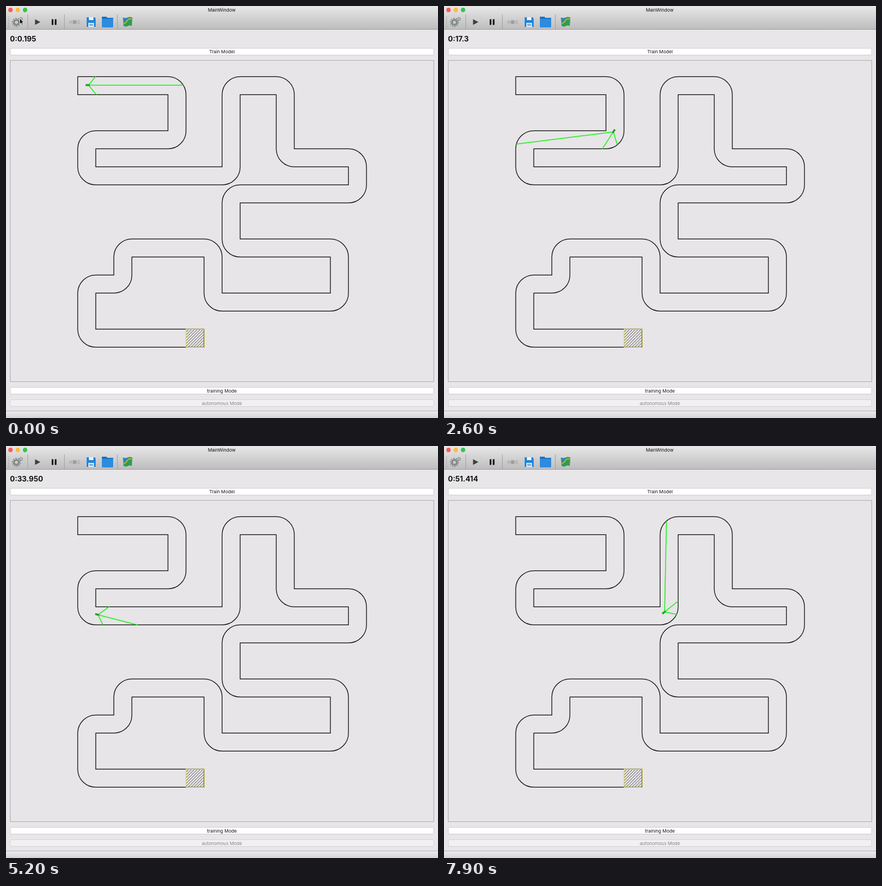
An HTML page that plays this animation: 766x731 px, repeating every 8000 ms.

```html
<!DOCTYPE html>
<html lang="en">
<head>
<meta charset="utf-8">
<title>MainWindow</title>
<style>
  html, body { margin: 0; width: 100%; height: 100%; overflow: hidden; background: #e8e6e8; }
  svg { display: block; width: 766px; height: 731px; }
  text { font: 8.1px Inter, "Liberation Sans", sans-serif; fill: #111; text-anchor: middle; }
  #clock { font-size: 12.9px; font-weight: 700; text-anchor: start; }
</style>
</head>
<body>
<svg id="stage" viewBox="0 0 766 731" xmlns="http://www.w3.org/2000/svg">
  <defs>
    <linearGradient id="bar" x2="0" y2="1">
      <stop stop-color="#e9e8e9"/><stop offset="1" stop-color="#bdbcbd"/>
    </linearGradient>
    <linearGradient id="status" x2="0" y2="1">
      <stop stop-color="#eceaec"/><stop offset="1" stop-color="#d5d3d5"/>
    </linearGradient>
    <pattern id="hatch" width="5.1" height="5.1" patternUnits="userSpaceOnUse" x="319" y="573">
      <path d="M-1 6.1L6.1-1M-1 1L1-1M4.1 6.1L6.1 4.1" stroke="#222" stroke-width=".8"/>
    </pattern>
  </defs>

  <rect width="766" height="731" fill="#e8e6e8"/>
  <rect width="766" height="42" fill="url(#bar)"/>
  <path d="M0 41.5H766" stroke="#a09fa0"/>
  <circle cx="8" cy="7" r="3.9" fill="#fc5b57"/>
  <circle cx="21" cy="7" r="3.9" fill="#fdbc40"/>
  <circle cx="33.8" cy="7" r="3.9" fill="#34c84a"/>
  <text x="382.5" y="10">MainWindow</text>

  <path d="M4.5 19V38" stroke="#858485" stroke-dasharray="1 2"/>
  <path d="M38.5 15V41M103.5 15V41M197.5 15V41" stroke="#a3a2a3"/>

  <g fill="none" stroke="#7f8886">
    <circle cx="18.5" cy="29" r="4.3" stroke-width="3"/>
    <circle cx="18.5" cy="29" r="7" stroke-width="2" stroke-dasharray="2.2 2.2"/>
    <circle cx="26.5" cy="23" r="2.4" stroke-width="2" stroke-dasharray="1.5 .8"/>
  </g>
  <path d="M51.5 23.5L61 28.5L51.5 33.5Z" fill="#3f3f3f"/>
  <path d="M81 23.5h3v10h-3zM86.5 23.5h3v10h-3z" fill="#111"/>
  <g fill="none" stroke="#a09fa0">
    <path d="M111 28.5H132" stroke-dasharray="3 1"/>
    <path d="M113 25L117 28.5L113 32M126 26H131M126 31H131"/>
    <path d="M119 25.5h3a3 3 0 0 1 0 6h-3z" fill="#a09fa0"/>
  </g>
  <path d="M143 20h14l2 2v15h-16z" fill="#1f86dd"/>
  <path d="M147 20h8v5h-8zM146 30h10v7h-10z" fill="#eaf2f8"/>
  <path d="M147.500 32.500h7M147.500 34.500h7" stroke="#3a78b4"/>
  <path d="M170 19h8l2 2h10v3h-20z" fill="#1a6fb9"/>
  <rect x="170" y="22.500" width="20" height="15.500" rx="1" fill="#2b8ce0"/>
  <path d="M207.500 20.500q4 2 8 0t8.500 0l-1 15q-4-2-7 0t-7.500 0z" fill="#2f9d50"/>
  <path d="M207.500 20.500q4 2 8 0l-3 7-4.500 1z" fill="#2f83c4"/>
  <path d="M209 31q4-1 6-5t8-3" fill="none" stroke="#f0b02c" stroke-width="1.600"/>

  <text id="clock" x="7" y="63"></text>
  <g id="buttons"></g>
  <rect x="7.500" y="96.500" width="751" height="570" fill="#e7e5e7" stroke="#adabad"/>
  <rect y="719" width="766" height="12" fill="url(#status)"/>
  <path d="M0 718.500H766" stroke="#b3b1b3"/>

  <g transform="translate(.2 .4)">
    <path id="track" fill="none" stroke="#0b0b0b" stroke-width="1.25"/>
    <rect x="319" y="573" width="32" height="32" fill="url(#hatch)" stroke="#dcd72c"/>
    <path id="rays" fill="none" stroke="#17f017" stroke-width="1.5"/>
    <rect id="car" x="-5" y="-1.500" width="7" height="3" fill="#3d8a3d" stroke="#1fc81f" stroke-width=".6"/>
  </g>
  <path id="cursor" d="M24.500 22v10l2.300-2.100 1.600 3.500 1.500-.7-1.600-3.400h3z" stroke="#fff" stroke-width=".7"/>
</svg>

<script>
const $ = id => document.getElementById(id);
const LOOP = 8000, STEP = 100, SPREAD = 50, CELL = 32, HALF = CELL / 2;
const DIRS = { R: [1, 0], L: [-1, 0], D: [0, 1], U: [0, -1] };

// Road as moves from cell to cell; every bend is round outside and square inside.
const ROUTE = "R5 D3 L5 D2 R8 U5 R3 D4 R4 D2 L7 D3 R6 D3 L7 U3 L5 D2 L2 D3 R6";

// The drive in legs: when each ends, what the clock (ms) then shows, and the way.
const legs = [
  { end: 1100, clock: 7356, way: "M146 140H243" },
  { end: 2600, clock: 17003, way: "M243 140H280Q302 140 302 162V214C302 218 302 220 300 223" },
  { end: 3600, clock: 23498, way: "M300 223C294 231 286 240 272 240L228 239" },
  { end: 5200, clock: 33950, way: "M228 239L168 238Q145 238 145 262V274C145 288 151 296 163 299" },
  { end: 6300, clock: 41086, way: "M163 299C178 303 195 299 215 299H245" },
  { end: 7900, clock: 51414, way: "M245 299H372Q385 299 391 294" }
];
legs.forEach((leg, i) => {
  const before = legs[i - 1] || { end: 0, clock: 195 };
  leg.start = before.end;
  leg.clockStart = before.clock;
  leg.path = document.createElementNS("http://www.w3.org/2000/svg", "path");
  leg.path.setAttribute("d", leg.way);
});

// Corners of both road edges, joined into one closed ring.
function roadCorners() {
  const sides = { 1: [], "-1": [] };
  const normal = d => [d[1], -d[0]];
  const add = (a, b, turn) => [1, -1].forEach(s => sides[s].push({
    x: x + s * HALF * a[0] + HALF * b[0],
    y: y + s * HALF * a[1] + HALF * b[1],
    round: s * turn > 0
  }));
  let x = 127 + HALF, y = 125 + HALF, last = null;
  for (const move of ROUTE.split(" ")) {
    const d = DIRS[move[0]], n = normal(d);
    if (last) {
      const m = normal(last);
      add([m[0] + n[0], m[1] + n[1]], [0, 0], last[0] * d[1] - last[1] * d[0]);
    } else add(n, [-d[0], -d[1]], 0);
    x += d[0] * CELL * move.slice(1);
    y += d[1] * CELL * move.slice(1);
    last = d;
  }
  add(normal(last), last, 0);
  return [...sides[1], ...sides[-1].reverse()];
}

function roundedPath(corners) {
  const toward = (p, q) => {
    const far = Math.hypot(q.x - p.x, q.y - p.y);
    return [(q.x - p.x) / far, (q.y - p.y) / far];
  };
  return corners.map((p, i) => {
    const pen = i ? "L" : "M";
    if (!p.round) return `${pen}${p.x} ${p.y}`;
    const a = toward(p, corners[i - 1]), b = toward(p, corners[i + 1]);
    const sweep = a[0] * b[1] - a[1] * b[0] < 0 ? 1 : 0;
    return `${pen}${p.x + a[0] * CELL} ${p.y + a[1] * CELL}` +
      `A${CELL} ${CELL} 0 0 ${sweep} ${p.x + b[0] * CELL} ${p.y + b[1] * CELL}`;
  }).join("") + "Z";
}

function button(y, label, fill, edge, ink) {
  return `<rect x="7.5" y="${y}" width="751" height="12" rx="2.5" fill="${fill}" stroke="${edge}" stroke-width=".8"/>
    <text x="382.8" y="${y + 9}" style="fill:${ink}">${label}</text>`;
}

// Walk from the car until the road ends.
function ray(x, y, degrees) {
  const angle = degrees * Math.PI / 180;
  const p = $("stage").createSVGPoint();
  p.x = x;
  p.y = y;
  for (let i = 0; i < 1200 && $("track").isPointInFill(p); i++) {
    p.x += Math.cos(angle) / 2;
    p.y += Math.sin(angle) / 2;
  }
  return `M${x} ${y}L${p.x} ${p.y}`;
}

function draw(t) {
  const leg = legs.find(l => t <= l.end);
  const part = (t - leg.start) / (leg.end - leg.start);
  const s = part * leg.path.getTotalLength();
  const { x, y } = leg.path.getPointAtLength(s);
  const back = leg.path.getPointAtLength(s - .5), ahead = leg.path.getPointAtLength(s + .5);
  const heading = Math.atan2(ahead.y - back.y, ahead.x - back.x) * 180 / Math.PI;
  const ms = Math.round(leg.clockStart + part * (leg.clock - leg.clockStart));

  $("clock").textContent = `0:${Math.floor(ms / 1000)}.${ms % 1000}`;
  $("rays").setAttribute("d", [-SPREAD, 0, SPREAD].map(a => ray(x, y, heading + a)).join(""));
  $("car").setAttribute("transform", `translate(${x} ${y}) rotate(${heading})`);
  $("cursor").style.display = t < 500 ? "" : "none";
}

$("track").setAttribute("d", roundedPath(roadCorners()));
$("buttons").innerHTML = button(75, "Train Model", "#fff", "#c4c2c4", "#111") +
  button(676.5, "training Mode", "#fff", "#c4c2c4", "#111") +
  button(698.5, "autonomous Mode", "#f2f0f2", "#d0ced0", "#858385");

const start = performance.now();
let shown = -1;
function tick() {
  const t = Math.floor((performance.now() - start) % LOOP / STEP) * STEP;
  if (t !== shown) draw(shown = t);
  requestAnimationFrame(tick);
}
tick();
</script>
</body>
</html>
```
